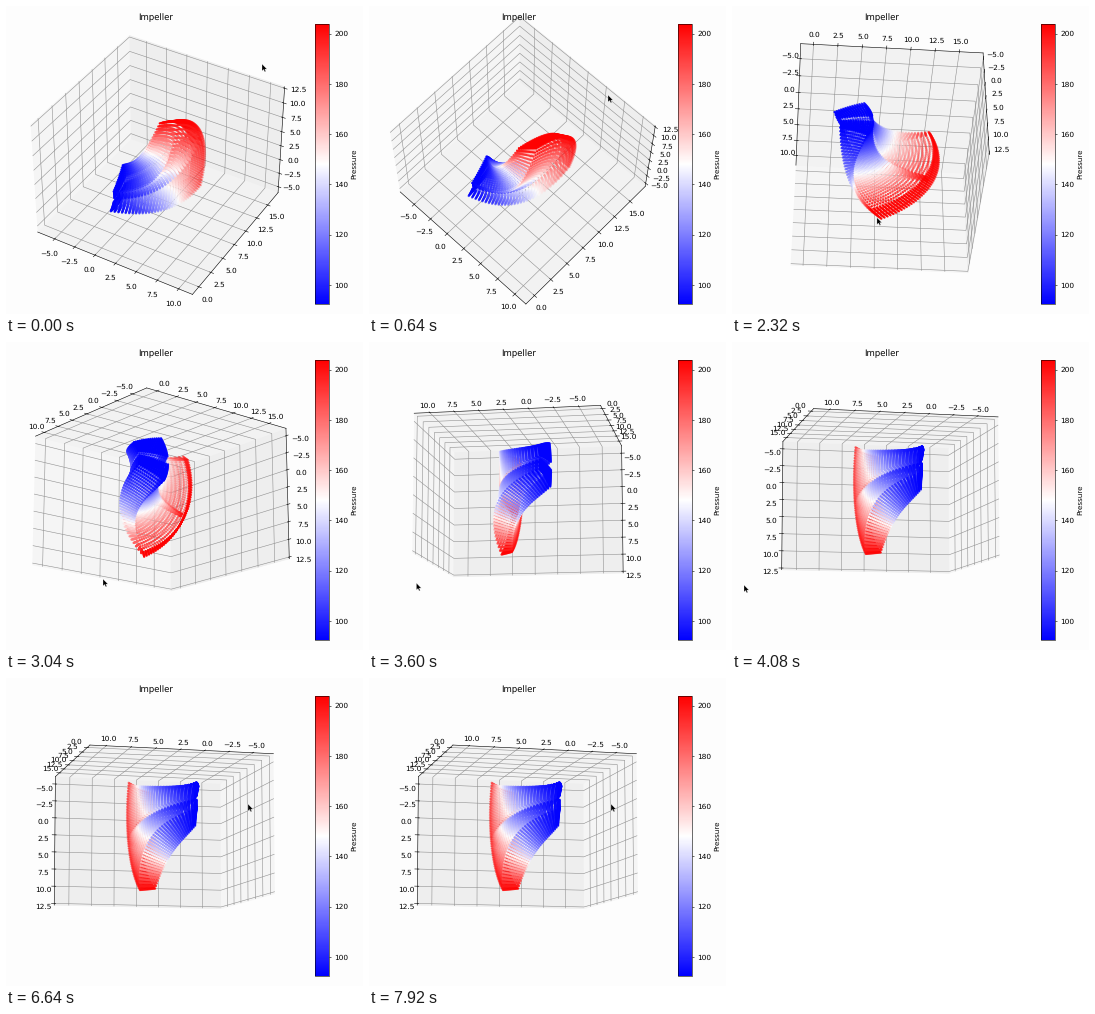
Write a matplotlib script that moves like this. It is 357 px wide and 308 px high and loops after 8000 ms.

```python
import numpy as np
import matplotlib.pyplot as plt
from matplotlib.animation import FuncAnimation
from matplotlib.patches import Polygon
from matplotlib.ticker import MultipleLocator

W, H, DPI = 357, 308, 51
FRAMES, STEP = 100, 80

plt.rcParams.update({
    "font.family": "DejaVu Sans", "text.hinting": "none",
    "xtick.labelsize": 10.4, "ytick.labelsize": 10.4,
    "grid.color": "0.57",
})


def glide(t, times, values):
    """Monotone cubic through (times, values), held at both ends."""
    times, values = np.asarray(times, float), np.asarray(values, float)
    t = np.clip(t, times[0], times[-1])
    gap = np.diff(times)
    slope = np.diff(values) / gap
    a, b = slope[:-1], slope[1:]
    inner = np.where(a * b > 0, 2 * a * b / (a + b + 1e-9), 0)
    m = np.concatenate([[slope[0]], inner, [0]])
    i = min(np.searchsorted(times, t, side="right") - 1, len(gap) - 1)
    u, h = (t - times[i]) / gap[i], gap[i]
    return ((1 + 2 * u) * (1 - u) ** 2 * values[i] + u * (1 - u) ** 2 * h * m[i]
            + u * u * (3 - 2 * u) * values[i + 1] + u * u * (u - 1) * h * m[i + 1])


def bezier(s, p0, p1, p2):
    return [(1 - s) ** 2 * a + 2 * s * (1 - s) * b + s * s * c
            for a, b, c in zip(p0, p1, p2)]


def passage(stream=34, pitch=48, span=14):
    """Shell of the flow passage around one blade, turning about the x axis."""
    s, p, c = (v.ravel() for v in np.meshgrid(
        np.linspace(0, 1, stream), np.linspace(0, 1, pitch),
        np.linspace(0, 1, span), indexing="ij"))
    i, j, k = (v.ravel() for v in np.indices((stream, pitch, span)))
    shell = ((i == 0) | (i == stream - 1) | (k == 0) | (k == span - 1)
             | (j == 0) | (j == pitch - 1)
             | (j == pitch // 2 - 1) | (j == pitch // 2))
    s, p, c = s[shell], p[shell], c[shell]

    # the blade opens a thin wedge at mid pitch
    side = np.where(p < 0.5, -1, 1)
    wedge = 0.08 * np.clip(1 - s / 0.8, 0, 1)
    q = 0.5 + side * (wedge + np.abs(p - 0.5) * (1 - 2 * wedge))

    hub_x, hub_r = bezier(s, (-0.4, 3.3), (6.2, 4.5), (4.4, 13.9))
    tip_x, tip_r = bezier(s, (-1.0, 6.5), (2.6, 6.4), (3.1, 13.2))
    x = hub_x + c * (tip_x - hub_x)
    r = hub_r + c * (tip_r - hub_r)

    turn = 1 - (1 - s) ** 2.5
    low, high = -40 + 20.5 * turn, 15 + 41 * turn
    lean = c * (4 + 5 * (1 - s))
    theta = np.radians(low + q * (high - low) + lean)

    load = (2 * p) % 1 - 0.5
    pressure = 93 + 110 * s ** 1.3 + 20 * np.sin(np.pi * s) * load
    return x, r * np.cos(theta), r * np.sin(theta), pressure


fig = plt.figure(figsize=(W / DPI, (H + 0.001) / DPI), dpi=DPI, facecolor="#fdfdfd")
ax = fig.add_axes([8.6 / W, 10 / H, 282.8 / W, 280 / H], projection="3d",
                  facecolor="none")
cax = fig.add_axes([309 / W, 10 / H, 14 / W, 280 / H])

x, y, z, pressure = passage()
cloud = ax.scatter(x, y, z, c=pressure, cmap="bwr", vmin=92.4, vmax=203.8,
                   s=10, linewidths=0)
ax.set(xlim=(-7.15, 11.6), ylim=(-1.3, 17.45), zlim=(-6.1, 12.75))
for axis, pane in ((ax.xaxis, "#f5f5f5"), (ax.yaxis, "#eeeeee"), (ax.zaxis, "#f2f2f2")):
    axis.set_major_locator(MultipleLocator(2.5))
    axis.set_pane_color(pane)
fig.text(150 / W, 1 - 14.5 / H, "Impeller", size=12, ha="center", va="baseline")
fig.colorbar(cloud, cax=cax, label="Pressure", ticks=range(100, 201, 20))

ARROW = 0.85 * np.array([(0, 0), (0, 8.2), (1.9, 6.5), (3.2, 9.3), (4.5, 8.7),
                         (3.3, 6), (5.8, 6)])
cursor = Polygon(ARROW, facecolor="black", edgecolor="white", linewidth=0.4,
                 transform=fig.transFigure, zorder=10)
fig.add_artist(cursor)

VIEW_T = [0, 640, 1600, 3040, 4080, 4400]
AZIM = [-59.3, -46.4, -24, 39.5, 103.0, 104.2]
ELEV = [38, 63.5, 103, 163.4, 172, 172.4]

# pointer while dragging, then coming back after leaving the stage
DRAG = ([0, 640, 1600, 3040, 4080, 4400, 4480],
        [256, 239, 188, 97, 12, 2, -12],
        [58, 89, 168, 237, 243, 244, 244])
BACK = ([5360, 5520, 6160, 6500],
        [-10, 10, 200, 242],
        [300, 290, 152, 126])


def draw(n):
    t = n * STEP
    ax.view_init(elev=glide(t, VIEW_T, ELEV), azim=glide(t, VIEW_T, AZIM))
    times, xs, ys = DRAG if t < 5000 else BACK
    tip = np.array([glide(t, times, xs), glide(t, times, ys)])
    cursor.set_xy((ARROW + tip) * [1 / W, -1 / H] + [0, 1])
    return cloud, cursor


anim = FuncAnimation(fig, draw, frames=FRAMES, interval=STEP, repeat=True,
                     repeat_delay=0, init_func=lambda: draw(0), blit=False)
plt.show()
```
